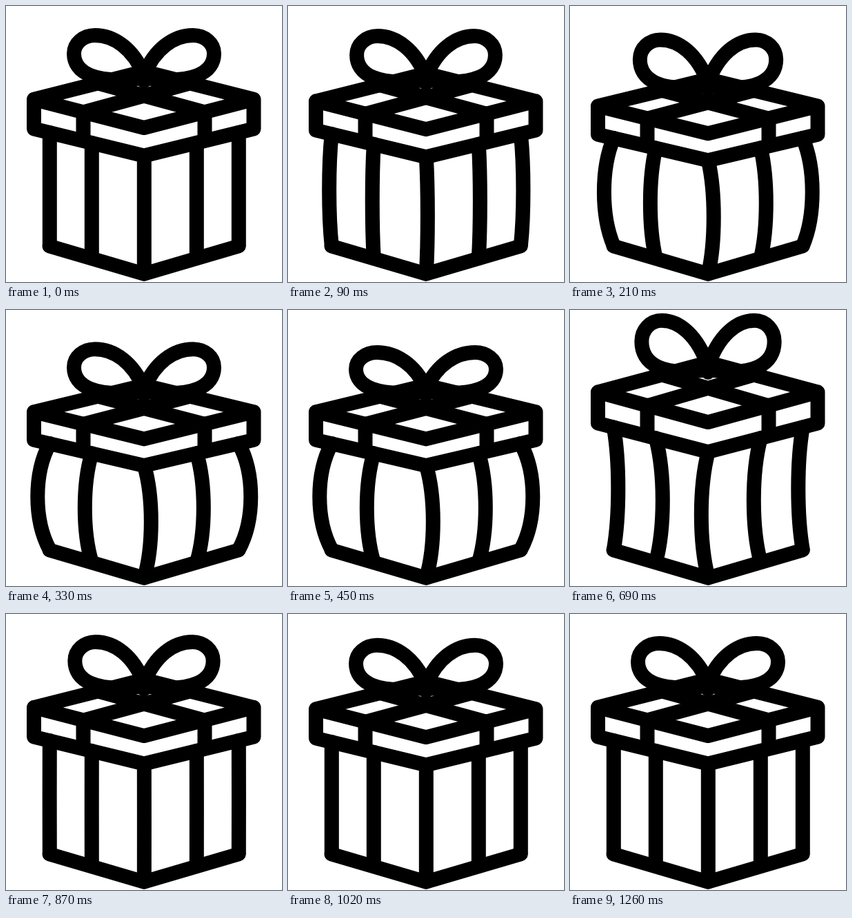
An HTML page that plays this animation: 400x400 px, repeating every 3.32 s.

```html
<!DOCTYPE html>
<html lang="en">
<head>
<meta charset="utf-8">
<title>Gift box</title>
<style>
html, body { margin: 0; width: 100%; height: 100%; overflow: hidden; background: #fff; }
svg { display: block; width: 100vw; height: 100vh; }
path {
  fill: none; stroke: #000; stroke-width: 21; stroke-linecap: round; stroke-linejoin: round;
  vector-effect: non-scaling-stroke;
}
</style>
</head>
<body>
<svg viewBox="0 0 400 400">
  <path d="M63 348L200 388.3L337 348"/>
  <path id="sides"/>
  <g id="lid">
    <path d="M40.5 135.3L200 95L359 135.3V178L200 217L40.5 178ZL200 176.5L359 135.3"/>
    <path d="M112 198V154L266 112M288 198V154L134 112" style="stroke-linecap:butt"/>
  </g>
  <path id="bow"/>
</svg>
<script>
const LOOP = 3320, STEP = 30;

// squash, leap, settle: [time, value]
const dropKeys = [[0, 0], [300, 10.5], [450, 10.5], [690, -14], [940, 3.2], [1170, -0.8], [1260, 0]];
const stretchKeys = [[0, 1], [210, 1.08], [450, 0.91], [690, 1.15], [960, 1]];

const $ = id => document.getElementById(id);

function ease(keys, t) {
  const i = keys.findIndex(k => k[0] > t);
  if (i < 0) return keys[keys.length - 1][1];
  const [t0, a] = keys[i - 1], [t1, b] = keys[i];
  return a + (b - a) * (1 - Math.cos(Math.PI * (t - t0) / (t1 - t0))) / 2;
}

// the back of the lid travels further than its front
const lidScale = drop => 1 - drop / 230;
const lidShift = drop => 1.76 * drop;
const onLid = (y, drop) => y * lidScale(drop) + lidShift(drop);

function sidesPath(drop, bulge) {
  return [-137, -76, 0, 76, 137].map(u => {
    const x = 200.3 + u, d = Math.abs(u);
    const top = onLid(217 - 0.245 * d, drop), foot = 388 - 0.295 * d;
    const reach = d < 100 ? 10 : bulge > 0 ? 17.5 : 6.5;
    const cx = x + (u < 0 ? -1 : 1) * reach * bulge / 0.75;
    const h = (foot - top) * 0.28;
    return `M${x} ${top}C${cx} ${top + h} ${cx} ${foot - h} ${x} ${foot}`;
  }).join("");
}

function bowPath(knot, sx, sy) {
  const half = side => {
    const pt = (x, y) => `${200 + side * x * sx} ${knot + y * sy} `;
    return "M" + pt(0, 0) +
      "C" + pt(16, -39) + pt(44, -57.5) + pt(71, -57.5) +
      "C" + pt(88, -57.5) + pt(101.5, -46) + pt(101.5, -31) +
      "C" + pt(101.5, -4) + pt(72, 14) + pt(0, 4);
  };
  return half(-1) + half(1) + `M200 ${knot - 6}V${knot + 9}`;
}

function draw(ms) {
  const t = Math.floor((ms % LOOP) / STEP) * STEP;
  const drop = ease(dropKeys, t), sy = ease(stretchKeys, t);
  const sx = 1 - 0.35 * Math.max(0, sy - 1);
  // the walls stay straight once the lid has landed
  const bulge = t > 870 ? 0 : drop / (drop > 0 ? 10.5 : 14);
  $("sides").setAttribute("d", sidesPath(drop, bulge));
  $("lid").setAttribute("transform", `translate(0 ${lidShift(drop)}) scale(1 ${lidScale(drop)})`);
  $("bow").setAttribute("d", bowPath(onLid(100, drop), sx, sy));
}

const start = performance.now();
function tick() {
  draw(performance.now() - start);
  requestAnimationFrame(tick);
}
tick();
</script>
</body>
</html>
```
